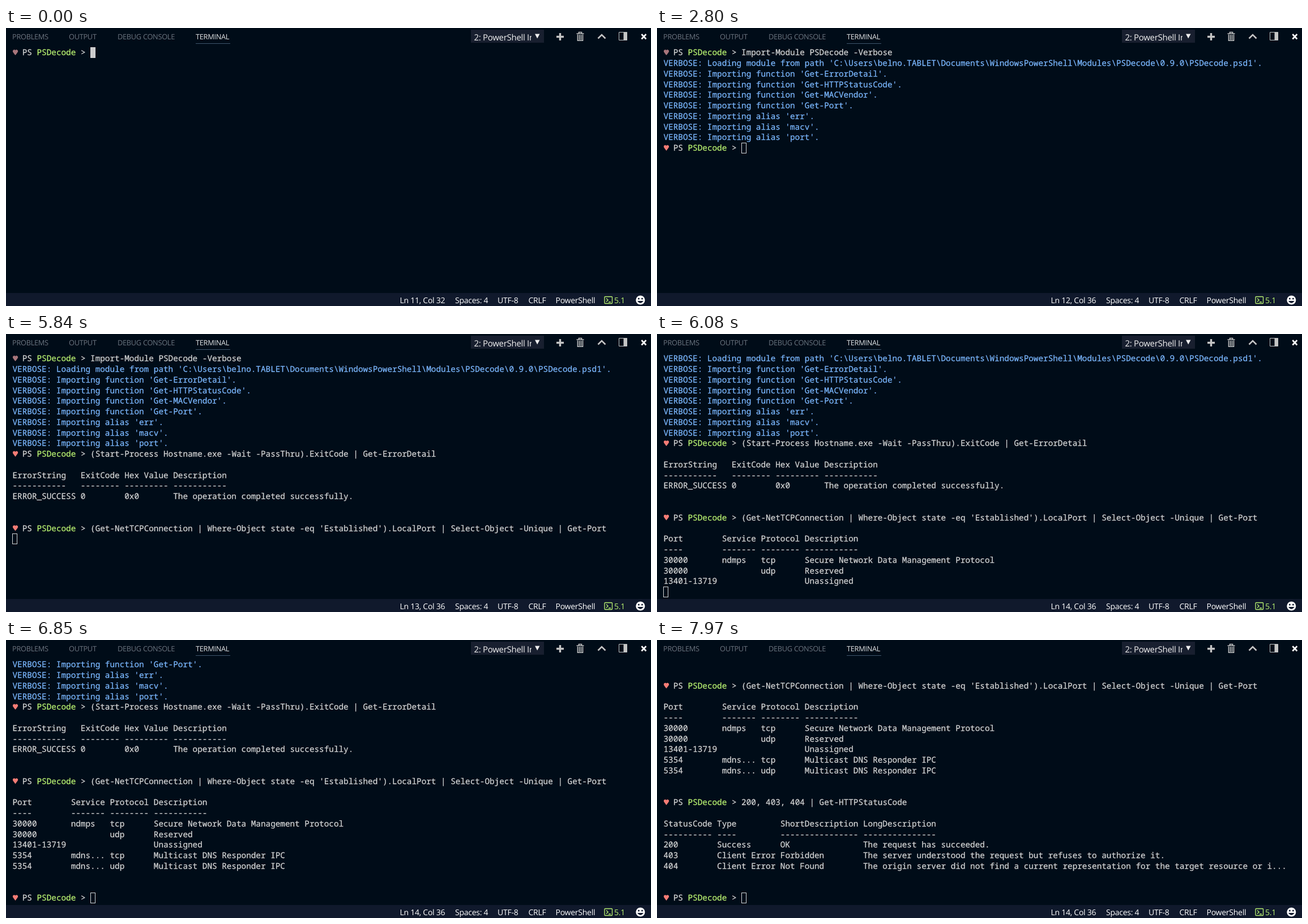
These frames come from a looping animation (1139x492 px, 8000 ms). An HTML page:

```html
<!DOCTYPE html>
<html lang="en">
<head>
<meta charset="utf-8">
<title>Terminal session</title>
<style>
  html, body { margin: 0; width: 100%; height: 100%; overflow: hidden; background: #000c18; }
  svg, pre, #cursor { position: absolute; }
  svg { left: 0; top: 0; font-family: "Open Sans", sans-serif; text-rendering: geometricPrecision; }
  pre {
    left: 11.5px; top: 35.3px; margin: 0; color: #d6d6d6;
    font: 14.333px/18.77px "Noto Sans Mono", monospace;
    -webkit-text-stroke: .25px;
    font-variant-ligatures: none; text-rendering: geometricPrecision;
  }
  .verbose { color: #7cb8ff; }
  .name { color: #b8f171; }
  .heart {
    display: inline-block; width: 10px; height: 11px; margin-right: -1.4px; background: #f77c75;
    clip-path: path("M5 11Q1.5 6.5 .4 4.6A2.6 2.8 0 0 1 5 2.2A2.6 2.8 0 0 1 9.6 4.6Q8.5 6.5 5 11Z");
  }
  .dim { background: #a8757b; }
  #cursor { box-sizing: border-box; width: 9px; height: 19px; border: 1px solid #d6d6d6; }
  .tabs { font-size: 12.8px; letter-spacing: -.3px; fill: #6b747f; }
  .status { font-size: 14px; letter-spacing: -.25px; fill: #fff; }
</style>
</head>
<body>
<svg width="1139" height="492" viewBox="0 0 1139 492">
  <g class="tabs">
    <text x="11" y="19.5">PROBLEMS</text>
    <text x="111" y="19.5">OUTPUT</text>
    <text x="197" y="19.5">DEBUG CONSOLE</text>
    <text x="335" y="19.5" fill="#e0e2e4">TERMINAL</text>
  </g>
  <path d="M335 27.5H396" stroke="#40566c"/>

  <rect x="821" y="3" width="129" height="23" fill="#181f2f"/>
  <svg width="928" height="30">
    <text x="826.5" y="21.5" font-size="15" letter-spacing="-.3" fill="#f0f0f0">2: PowerShell Integrated</text>
  </svg>
  <path d="M934 10.5H942.5L938.2 18.5Z" fill="#f0f0f0"/>

  <g fill="none" stroke="#c5c5c5">
    <path d="M972 15.5H985M978.5 9V22" stroke-width="3.4"/>
    <path d="M1007.5 10H1020.5M1011.5 9.5V7.5H1016.5V9.5" stroke-width="1.6"/>
    <path d="M1009.5 11.5V22.2H1018.5V11.5M1012.5 12V21M1015.5 12V21" stroke-width="1.6"/>
    <path d="M1045.5 18.5L1052 12L1058.5 18.5" stroke-width="2.6"/>
    <path d="M1082.5 7.5H1096.5V21.5H1082.5Z"/>
    <path d="M1093.5 7V22" stroke-width="6"/>
    <path d="M1122.3 11L1130.3 19.5M1130.3 11L1122.3 19.5" stroke="#fff" stroke-width="2.6"/>
  </g>

  <rect y="469" width="1139" height="23" fill="#10192c"/>
  <g class="status">
    <text id="place" x="695.5" y="486.8"></text>
    <text x="793" y="486.8">Spaces: 4</text>
    <text x="868" y="486.8">UTF-8</text>
    <text x="922.5" y="486.8">CRLF</text>
    <text x="970.5" y="486.8">PowerShell</text>
    <text x="1074" y="486.8" fill="#b8f171">5.1</text>
  </g>
  <g fill="none" stroke="#b8f171" stroke-width="1.3">
    <rect x="1057" y="475.5" width="13.5" height="12" rx="1"/>
    <path d="M1060 478.5L1063.2 481.5L1060 484.5M1064 485H1068"/>
  </g>
  <circle cx="1120.3" cy="481.5" r="8" fill="#fff"/>
  <g fill="#10192c">
    <circle cx="1117.3" cy="479" r="1.5"/>
    <circle cx="1123.3" cy="479" r="1.5"/>
    <path d="M1115 483H1125.6Q1120.3 490.5 1115 483Z"/>
  </g>
</svg>
<pre id="screen"></pre>
<div id="cursor"></div>

<script>
const LOOP = 8000, CELL = 8.6, ROW = 18.77, LEFT = 11.4, TOP = 34.3, LAST_ROW = 22;
const PROMPT = '> ';
const $ = id => document.getElementById(id);

// Cells are separated by "|" and padded to the column widths.
function table(widths, head, ...rows) {
  const line = text => text.split('|').map((cell, i) => cell.padEnd(widths[i] || 0)).join('');
  return ['', line(head), line(head.replace(/[^|]/g, '-')), ...rows.map(line), '', ''];
}

const log = [
  PROMPT + 'Import-Module PSDecode -Verbose',
  String.raw`VERBOSE: Loading module from path 'C:\Users\belno.TABLET\Documents\WindowsPowerShell\Modules\PSDecode\0.9.0\PSDecode.psd1'.`,
  ...['ErrorDetail', 'HTTPStatusCode', 'MACVendor', 'Port'].map(f => `VERBOSE: Importing function 'Get-${f}'.`),
  ...['err', 'macv', 'port'].map(a => `VERBOSE: Importing alias '${a}'.`),
  PROMPT + '(Start-Process Hostname.exe -Wait -PassThru).ExitCode | Get-ErrorDetail',
  ...table([14, 9, 10],
    'ErrorString|ExitCode|Hex Value|Description',
    'ERROR_SUCCESS|0|0x0|The operation completed successfully.'),
  PROMPT + "(Get-NetTCPConnection | Where-Object state -eq 'Established').LocalPort | Select-Object -Unique | Get-Port",
  ...table([12, 8, 9],
    'Port|Service|Protocol|Description',
    '30000|ndmps|tcp|Secure Network Data Management Protocol',
    '30000||udp|Reserved',
    '13401-13719|||Unassigned',
    '5354|mdns...|tcp|Multicast DNS Responder IPC',
    '5354|mdns...|udp|Multicast DNS Responder IPC'),
  PROMPT + '200, 403, 404 | Get-HTTPStatusCode',
  ...table([11, 13, 17],
    'StatusCode|Type|ShortDescription|LongDescription',
    '200|Success|OK|The request has succeeded.',
    '403|Client Error|Forbidden|The server understood the request but refuses to authorize it.',
    '404|Client Error|Not Found|The origin server did not find a current representation for the target resource or i...'),
  PROMPT
];

// Each step changes some of: lines shown, whether the last prompt is still empty, cursor line, editor place.
let state = { focus: true, place: 'Ln 11, Col 32' };
const steps = [
  [0, { count: 1, empty: true }],
  [1160, { focus: false }],
  [1790, { count: 4, empty: false, line: 2 }],
  [1870, { count: 10, empty: true, line: undefined }],
  [2800, { place: 'Ln 12, Col 36' }],
  [3730, { empty: false }],
  [4600, { place: 'Ln 13, Col 36' }],
  [4740, { count: 14 }],
  [4830, { count: 17, empty: true }],
  [5840, { empty: false }],
  [5990, { place: 'Ln 14, Col 36' }],
  [6080, { count: 23 }],
  [6540, { count: 25 }],
  [6850, { count: 28, empty: true }],
  [7630, { empty: false }],
  [7970, { count: 37, empty: true }]
].map(([time, change]) => ({ time, ...(state = { ...state, ...change }) }));

function format(text, index, bare) {
  if (text.startsWith('VERBOSE')) return `<span class="verbose">${text}</span>`;
  if (!text.startsWith(PROMPT)) return text;
  const heart = `<span class="heart${index ? '' : ' dim'}"></span>`;
  return `${heart} PS <span class="name">PSDecode</span> ${bare ? PROMPT : text}`;
}

function show({ count, empty, line = empty ? count - 1 : count, focus, place }) {
  const scroll = Math.max(0, line - LAST_ROW);
  $('screen').innerHTML = log.slice(0, count)
    .map((text, i) => format(text, i, empty && i === count - 1))
    .slice(scroll).join('\n');
  const { style } = $('cursor');
  style.left = LEFT + (empty ? 16 : 0) * CELL + 'px';
  style.top = TOP + (line - scroll) * ROW + 'px';
  style.background = focus ? '#ccc' : 'none';
  $('place').textContent = place;
}

let shown;
function frame() {
  const time = performance.now() % LOOP;
  const step = steps.findLast(s => s.time <= time);
  if (step !== shown) show(shown = step);
  requestAnimationFrame(frame);
}
frame();
</script>
</body>
</html>
```
